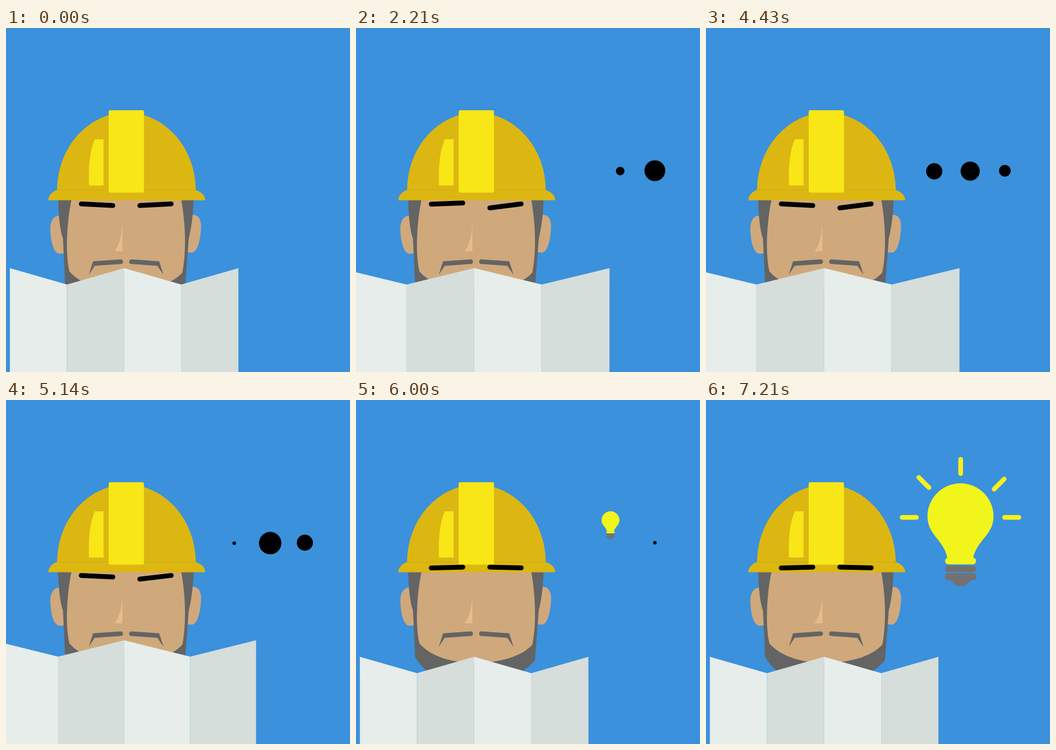
An HTML page with a canvas for the animation above (8000 ms loop, 640x640 px).

```html
<!DOCTYPE html>
<html lang="en">
<head>
<meta charset="utf-8">
<title>Builder's idea</title>
<style>
  html, body { margin: 0; width: 100%; height: 100%; overflow: hidden; background: #3b91db; }
  canvas { display: block; width: 640px; height: 640px; }
</style>
</head>
<body>
<canvas id="stage" width="640" height="640"></canvas>
<script>
const ctx = document.getElementById('stage').getContext('2d');
const LOOP = 8000;
const COLOR = {
  sky: '#3b91db', hat: '#dcb712', hatLight: '#f8e616', brimLine: '#cbaa14',
  skin: '#cfa97c', nose: '#e7bc8d', hair: '#646464',
  paper: '#e6edea', paperShade: '#d5dedb',
  bulb: '#f1f51c', socket: '#727272', ray: '#f8f01c'
};

const linear = u => u;
const sine = u => (1 - Math.cos(Math.PI * u)) / 2;
const cubic = u => u < 0.5 ? 4 * u ** 3 : 1 - 4 * (1 - u) ** 3;
const progress = (t, from, to, ease = sine) =>
  ease(Math.min(1, Math.max(0, (t - from) / (to - from))));
const mix = (a, b, u) => a + (b - a) * u;

// Eased interpolation through [time, value] keys.
function track(t, keys) {
  if (t <= keys[0][0]) return keys[0][1];
  for (let i = 1; i < keys.length; i++) {
    const [t0, v0] = keys[i - 1], [t1, v1] = keys[i];
    if (t < t1) return mix(v0, v1, progress(t, t0, t1));
  }
  return keys[keys.length - 1][1];
}

const pop = (t, start, step) =>
  track(t, [[start, 0], [start + step, 1.2], [start + 2 * step, 1]]);

const SHAPE = {
  leftEar: 'M98 349C88 350 82 360 82.5 375C83 395 88 420 100 420L109 419L107 385Z',
  rightEar: 'M347 347.5C358 347 363 356 363 370C362 392 357 418 345 418L336 417L340 380Z',
  hair: 'M97 319C98 350 100 375 106 392L110 478Q118 492 132 504L160 522H290L312 503' +
        'Q325 494 333 484L340 392C345 370 348 350 349 319Z',
  face: 'M122 319C113 360 110 420 118 453C140 478 180 489 222 489' +
        'C265 489 308 478 328 455C335 420 335 370 326 319Z',
  nose: 'M216.5 364C215 385 212 402 202 415.5H216.5Z',
  leftTache: 'M162 434L213 430.5Q217.7 430.8 217.7 434.7Q217.5 438.6 213.5 439L165 442.5L154 459Z',
  rightTache: 'M285 434L233.5 430.5Q229 430.8 229 434.7Q229.2 438.6 233 439L281.5 442.5L293 459Z',
  dome: 'M95 302A129 144.5 0 0 1 353 302Z',
  brim: 'M79 320.5C78 312 86 304 96 301H352C364 305 371 312 370.5 320.5Z',
  shine: 'M165.5 207H181.5V293H154.5C153 265 155 228 165.5 207Z',
  bulb: 'M412 216.5A61.5 61.5 0 0 1 535 216.5C535 251 503 262 497 294H449C444 262 412 251 412 216.5Z',
  tip: 'M453 334L464 344Q466 346 469 346H479Q482 346 484 344L494 334Z'
};
for (const key in SHAPE) SHAPE[key] = new Path2D(SHAPE[key]);

function shape(name, color) {
  ctx.fillStyle = color;
  ctx.fill(SHAPE[name]);
}

function pill(x, y, w, h, r, color) {
  ctx.fillStyle = color;
  ctx.beginPath();
  ctx.roundRect(x, y, w, h, r);
  ctx.fill();
}

function line(x1, y1, x2, y2, width, color) {
  ctx.strokeStyle = color;
  ctx.lineWidth = width;
  ctx.lineCap = 'round';
  ctx.beginPath();
  ctx.moveTo(x1, y1);
  ctx.lineTo(x2, y2);
  ctx.stroke();
}

function scaled(x, y, s, draw) {
  if (s <= 0) return;
  ctx.save();
  ctx.translate(x, y);
  ctx.scale(s, s);
  ctx.translate(-x, -y);
  draw();
  ctx.restore();
}

function drawHead() {
  shape('leftEar', COLOR.skin);
  shape('rightEar', COLOR.skin);
  shape('hair', COLOR.hair);
  shape('face', COLOR.skin);
  shape('nose', COLOR.nose);
  shape('leftTache', COLOR.hair);
  shape('rightTache', COLOR.hair);
  shape('dome', COLOR.hat);
  shape('brim', COLOR.hat);
  ctx.fillStyle = COLOR.brimLine;
  ctx.fillRect(95, 301, 258, 1);
  shape('shine', COLOR.hatLight);
  pill(191, 153, 65.7, 153.3, 3, COLOR.hatLight);
}

function drawBrows(t) {
  const frown = progress(t, 0, 880);
  const relax = progress(t, 1780, 2860);
  const lift = progress(t, 4990, 5950);
  const tilt = frown * (1 - relax);
  line(140, mix(mix(327.3, 327.8, tilt), 312.4, lift),
       198.8, mix(mix(330.3, 323.1, tilt), 311, lift), 9, '#000');
  line(248.9, mix(mix(330.3, 334.7, frown), 311, lift),
       307.4, mix(327.3, 312.2, lift), 9, '#000');
}

function drawPaper(t) {
  const open = progress(t, 880, 1710, linear) - progress(t, 4985, 5945, linear);
  const fold = mix(106.3, 125.9, open);
  const drop = 31 * progress(t, 5000, 5950, cubic);
  const high = 446.7 + drop, low = 477.2 + drop;
  for (let i = 0; i < 4; i++) {
    const x = 219.8 + (i - 2) * fold;
    ctx.fillStyle = i % 2 ? COLOR.paperShade : COLOR.paper;
    ctx.beginPath();
    ctx.moveTo(x, i % 2 ? low : high);
    ctx.lineTo(x + fold, i % 2 ? high : low);
    ctx.lineTo(x + fold, 641);
    ctx.lineTo(x, 641);
    ctx.fill();
  }
}

// Each dot swells, dips, swells again and vanishes.
const PULSE = [[0, 0], [590, 21], [860, 15], [1130, 15], [1470, 21], [2010, 0]];
const DOTS = [[424.6, 266.6, 0], [491.5, 266.2, 430], [556, 265.5, 860]];

function drawDots(t) {
  const local = t < 3270 ? t : t - 3270;
  ctx.fillStyle = '#000';
  for (const [x, y, delay] of DOTS) {
    const r = track(local - delay, PULSE);
    if (r <= 0) continue;
    ctx.beginPath();
    ctx.arc(x, y, r, 0, 2 * Math.PI);
    ctx.fill();
  }
}

const RAYS = [
  [365, 218.3, 391.6, 218.3],
  [395.8, 144, 414.8, 163],
  [473.8, 110.4, 473.8, 137],
  [554.8, 147, 536, 165.8],
  [555.5, 218.3, 582.1, 218.3]
];

function drawBulb(t) {
  RAYS.forEach(([x1, y1, x2, y2], i) =>
    scaled((x1 + x2) / 2, (y1 + y2) / 2, pop(t, 6225 + 140 * i, 200),
      () => line(x1, y1, x2, y2, 8.7, COLOR.ray)));
  scaled(473.5, 226.5, pop(t, 5900, 320), () => {
    shape('bulb', COLOR.bulb);
    pill(444.8, 293.3, 57.7, 12.4, 6.2, COLOR.bulb);
    pill(445, 308.3, 57.8, 11.7, 5.8, COLOR.socket);
    pill(444.2, 322, 59, 13.3, 6.6, COLOR.socket);
    shape('tip', COLOR.socket);
  });
}

function render(t) {
  ctx.fillStyle = COLOR.sky;
  ctx.fillRect(0, 0, 640, 640);
  drawHead();
  drawBrows(t);
  drawPaper(t);
  drawDots(t);
  drawBulb(t);
}

const start = performance.now();
function tick() {
  render((performance.now() - start) % LOOP);
  requestAnimationFrame(tick);
}
tick();
</script>
</body>
</html>
```
